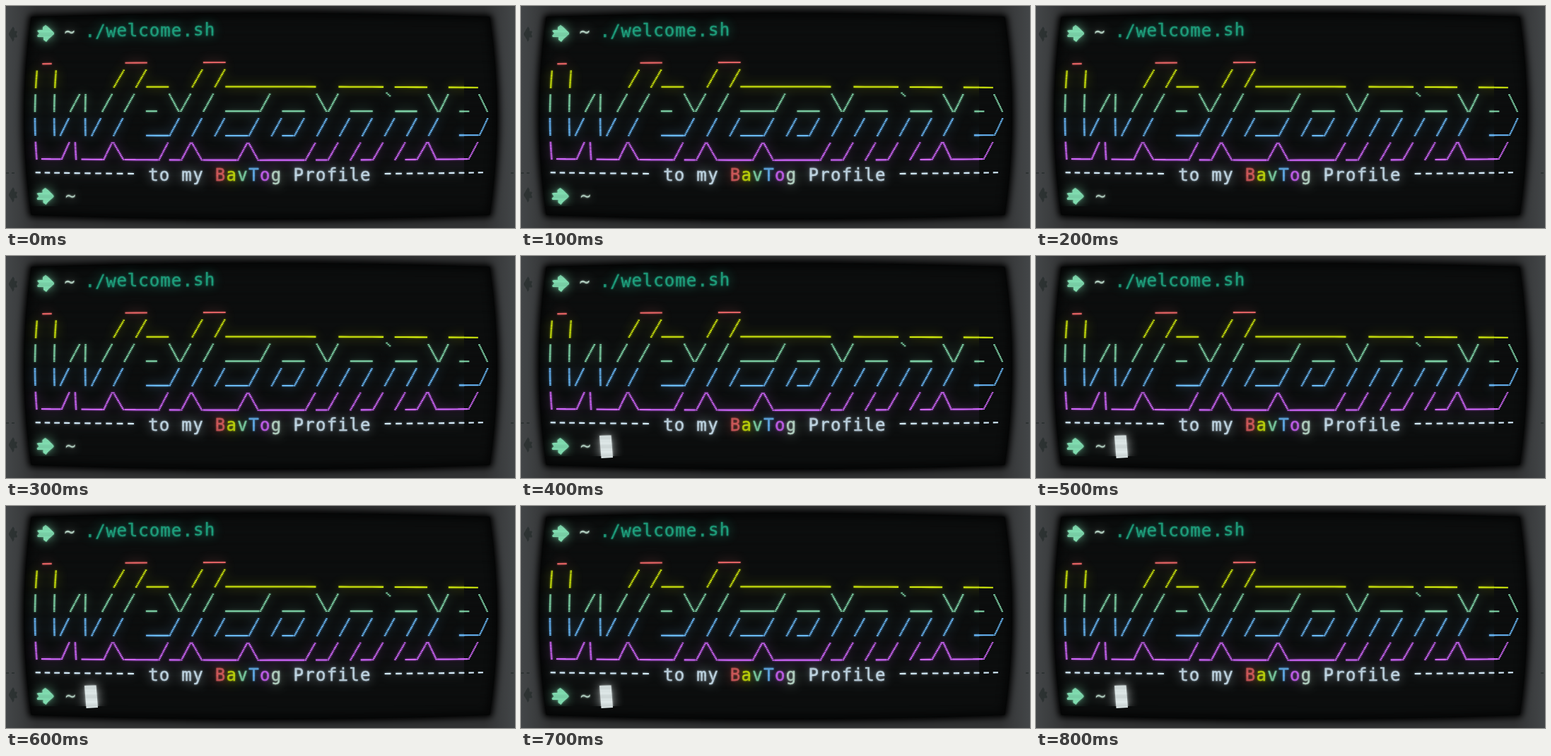
An HTML page for the animation above (900 ms loop, 720 px wide and 315 px high).

```html
<!DOCTYPE html>
<html lang="en">
<head>
<meta charset="utf-8">
<title>Welcome</title>
<style>
  html, body { margin: 0; width: 100%; height: 100%; overflow: hidden; background: #303132; }
  svg { display: block; width: 100%; height: 100%; }
  text { font: 24px "DejaVu Sans Mono", "Noto Sans Mono", monospace; text-anchor: middle; stroke-width: .4; }
  filter { color-interpolation-filters: sRGB; }
</style>
</head>
<body>
<svg viewBox="0 0 720 315" xmlns="http://www.w3.org/2000/svg">
  <defs>
    <linearGradient id="bezel">
      <stop offset="0" stop-color="#434648"/>
      <stop offset=".06" stop-color="#323334"/>
      <stop offset=".94" stop-color="#323334"/>
      <stop offset="1" stop-color="#434648"/>
    </linearGradient>
    <pattern id="lines" width="8" height="2.17" patternUnits="userSpaceOnUse">
      <rect width="8" height=".9" fill="#000"/>
    </pattern>
    <filter id="shade" x="-10%" y="-10%" width="120%" height="120%"><feGaussianBlur stdDeviation="5"/></filter>
    <filter id="edge"><feGaussianBlur stdDeviation="1.2"/></filter>
    <filter id="near" filterUnits="userSpaceOnUse" width="720" height="315"><feGaussianBlur stdDeviation="1.4"/></filter>
    <filter id="far" filterUnits="userSpaceOnUse" width="720" height="315"><feGaussianBlur stdDeviation="8"/></filter>
    <path id="screen" d="M38 15Q360 4 682 15Q685 15 685 18Q705 156 685 294Q685 297 682 297Q360 309 38 297Q35 297 35 294Q15 156 35 18Q35 15 38 15Z"/>
    <path id="arrow" d="M-12-4L-9-5H-4V-9L0-12L4-9L12-1V1L4 8L1 12L-3 9V5H-11L-12 3L-9 0Z"/>
    <clipPath id="glass"><use href="#screen"/></clipPath>
  </defs>
  <rect width="720" height="315" fill="url(#bezel)"/>
  <use href="#screen" stroke="#000" stroke-width="7" filter="url(#shade)"/>
  <g fill="#17211f" opacity=".45">
    <use href="#arrow" transform="translate(10 40) scale(-.5 .9)"/>
    <use href="#arrow" transform="translate(10 268) scale(-.5 .9)"/>
    <path d="M0 236h4v2h-4zM8 236h4v2h-4zM714 236h4v2h-4z"/>
  </g>
  <use href="#screen" fill="#0d0f0f" filter="url(#edge)"/>
  <g clip-path="url(#glass)">
    <use href="#screen" fill="none" stroke="#000" stroke-width="14" filter="url(#shade)" opacity=".5"/>
    <g filter="url(#far)" opacity=".75"><use href="#type"/><use href="#art"/></g>
    <g filter="url(#near)" opacity=".65"><use href="#type"/><use href="#art"/></g>
    <g id="type">
      <g fill="#8df2c2">
        <use href="#arrow" x="56" y="39"/>
        <use href="#arrow" x="55.5" y="270"/>
      </g>
      <path id="cursor" d="M111 255L127.500 254.500L130 286L113.500 287Z" fill="#f4ffff"/>
    </g>
    <rect width="720" height="315" fill="url(#lines)" opacity=".3"/>
    <g id="art" fill="none"></g>
  </g>
</svg>
<script>
const type = document.getElementById("type");
const art = document.getElementById("art");
const cursor = document.getElementById("cursor");
const RED = "#e26263", YELLOW = "#cfe80c", GREEN = "#84dcae", BLUE = "#6bbcff",
      PURPLE = "#d267ff", PALE = "#c6e6d6", WHITE = "#d4ecfb", TEAL = "#22b08a";
const LOOP = 900, CURSOR_ON = 400;

// Barrel curve of the tube: text column and flat y to stage position
function place(col, y) {
  const u = col - 21, dy = y - 157;
  return [
    358.3 + (16.08 * u - 3.4e-6 * u ** 5) * (1 - 2e-6 * dy * dy),
    157 + dy * (1 - 7e-5 * u * u - 8e-11 * dy ** 4)
  ].map(n => +n.toFixed(2));
}

const floor = row => 45 + 34.75 * row;

function add(parent, tag, attrs, content = "") {
  const el = document.createElementNS("http://www.w3.org/2000/svg", tag);
  for (const key in attrs) el.setAttribute(key, attrs[key]);
  el.textContent = content;
  parent.append(el);
}

function write(row, col, text, color) {
  const spots = [...text].map((_, i) => place(col + i + .5, floor(row) - 4.5));
  const [x, y] = [0, 1].map(axis => spots.map(p => p[axis]).join(" "));
  add(type, "text", { x, y, fill: color, stroke: color }, text);
}

// Line characters: start and end as column offset and height above the row floor
const STROKES = {
  "_": [0, 0, 1, 0],
  "|": [.5, 24, .5, 0],
  "/": [.1, 0, .92, 24],
  "\\": [.08, 24, .9, 0],
  "`": [.28, 26, .55, 22],
  "-": [.22, 14.5, .78, 14.5]
};
const DOT = 2.17;

function draw(row, col, line, stroke) {
  let flat = "", dots = "";
  [...line].forEach((ch, i) => {
    if (!STROKES[ch]) return;
    const [x1, h1, x2, h2] = STROKES[ch], c = col + i, y = floor(row);
    if (h1 === h2) {
      flat += `M${place(c + x1, y - h1)}L${place(c + x2, y - h2)}`;
      return;
    }
    const steps = Math.round(Math.abs(h2 - h1) / DOT);
    for (let k = 0; k <= steps; k++) {
      const f = k / steps;
      const [x, top] = place(c + x1 + (x2 - x1) * f, y - h1 - (h2 - h1) * f);
      dots += `M${(x - 1.3).toFixed(2)} ${top}h2.6`;
    }
  });
  add(art, "path", { d: flat, stroke, "stroke-width": 2.1 });
  add(art, "path", { d: dots, stroke, "stroke-width": 1.6 });
}

write(0, 3, "~", PALE);
write(0, 5, "./welcome.sh", TEAL);
[
  [" _       __     __", RED],
  ["| |     / /__  / /________  ____ ___  ___", YELLOW],
  ["| | /| / / _ \\/ / ___/ __ \\/ __ `__ \\/ _ \\", GREEN],
  ["| |/ |/ /  __/ / /__/ /_/ / / / / / /  __/", BLUE],
  ["|__/|__/\\___/_/\\___/\\____/_/ /_/ /_/\\___/", PURPLE]
].forEach(([line, color], i) => draw(i + 1, 0, line, color));

draw(6, 0, "----------", WHITE);
write(6, 11, "to", WHITE);
write(6, 14, "my", WHITE);
[RED, YELLOW, GREEN, BLUE, PURPLE, PALE].forEach((color, i) => write(6, 17 + i, "BavTog"[i], color));
write(6, 24, "Profile", WHITE);
draw(6, 32, "----------", WHITE);
write(7, 3, "~", PALE);

const start = performance.now();
function render(now) {
  const t = Math.max(0, now - start) % LOOP;
  cursor.setAttribute("visibility", t >= CURSOR_ON ? "visible" : "hidden");
  requestAnimationFrame(render);
}
render(start);
</script>
</body>
</html>
```
